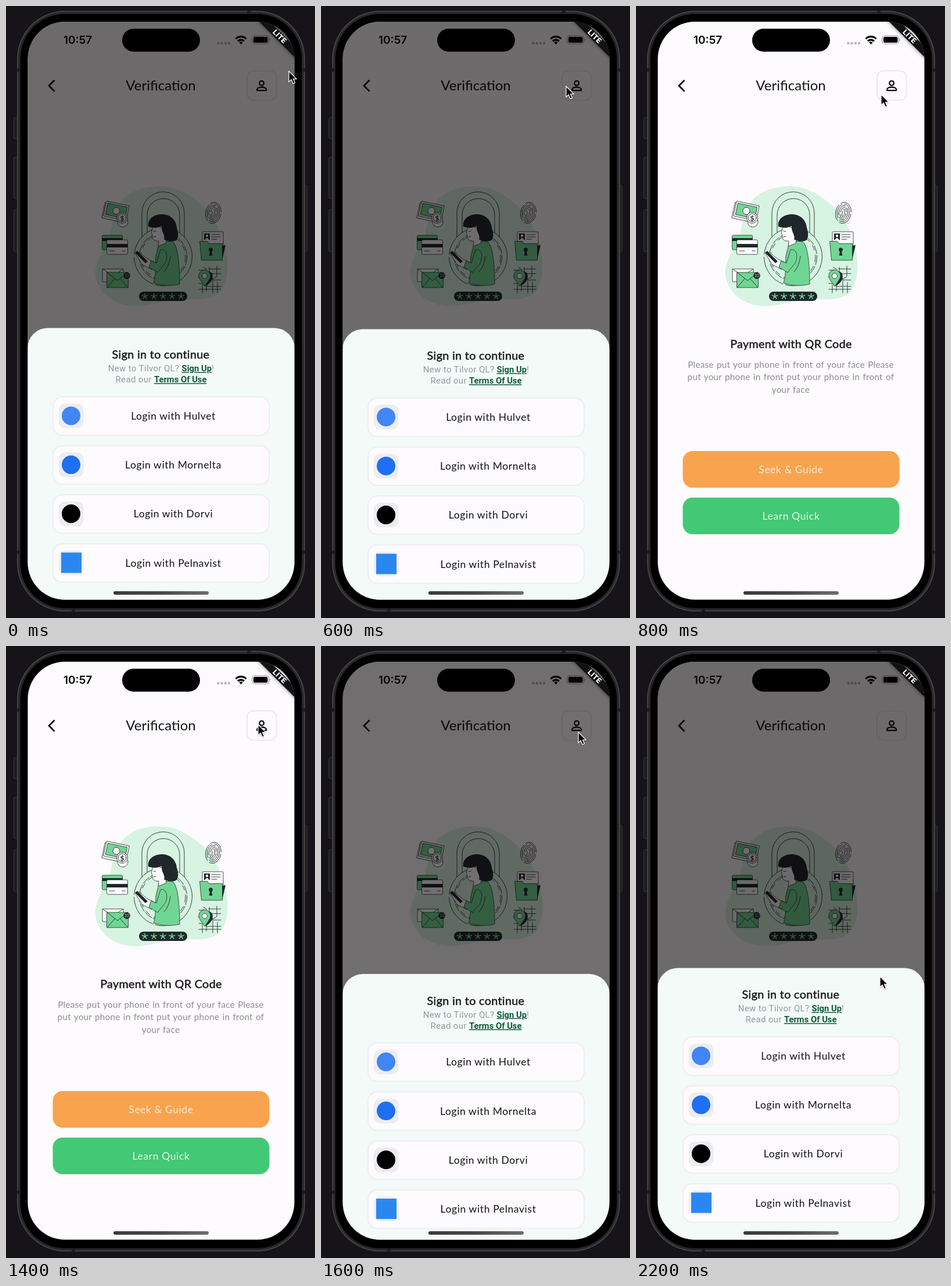
An HTML page that plays this animation: 532 px wide and 1052 px high, repeating every 2300 ms.

```html
<!DOCTYPE html>
<html lang="en">
<head>
<meta charset="utf-8">
<title>Sign-in sheet</title>
<style>
  html, body { margin: 0; width: 100%; height: 100%; overflow: hidden; background: #161418; }
  svg { display: block; width: 100%; height: 100%; }
  text { font-family: Lato, "Open Sans", sans-serif; }
  .mid { text-anchor: middle; }
  .title { font-size: 19.8px; letter-spacing: .32px; fill: #1b1b1d; stroke: #1b1b1d; stroke-width: .5; }
  .body { font-size: 15.3px; letter-spacing: .25px; word-spacing: 1px; fill: #8b8b8f; }
  .btn { font-size: 17.5px; letter-spacing: .62px; }
  .note { font: 15px Roboto, sans-serif; letter-spacing: .36px; fill: #909a9e; }
  .link { font-weight: 700; font-size: 14.8px; letter-spacing: 0; fill: #105a37; text-decoration: underline; }
  .ink { fill: none; stroke: #262b2d; stroke-width: .9; stroke-linejoin: round; stroke-linecap: round; }
  .green { fill: #70d693; stroke: #262b2d; stroke-width: .8; stroke-linejoin: round; }
  .white { fill: #fdfbfe; stroke: #262b2d; stroke-width: .8; stroke-linejoin: round; }
  .dark { fill: #20272b; }
</style>
</head>
<body>
<svg viewBox="0 0 532 1052" preserveAspectRatio="none">
  <defs>
    <clipPath id="screen"><rect x="37.500" y="27" width="459" height="993.500" rx="64"/></clipPath>
    <linearGradient id="bar">
      <stop stop-color="#3b393c"/><stop offset=".5" stop-color="#4a474b"/><stop offset="1" stop-color="#6f6c70"/>
    </linearGradient>
    <filter id="soft" x="-30%" y="-100%" width="160%" height="300%"><feGaussianBlur stdDeviation="3"/></filter>
    <filter id="blur" x="-50%" y="-50%" width="200%" height="200%"><feGaussianBlur stdDeviation="1.2"/></filter>
  </defs>

  <!-- phone body -->
  <rect width="532" height="1052" fill="#161418"/>
  <g fill="#1c1b1e" stroke="#39383b">
    <rect x="13.500" y="192" width="10" height="36" rx="2"/>
    <rect x="13.500" y="260" width="10" height="71" rx="2"/>
    <rect x="13.500" y="350" width="10" height="72" rx="2"/>
    <rect x="509" y="308" width="9.500" height="114" rx="2"/>
  </g>
  <rect x="20" y="9" width="494" height="1031" rx="82" fill="#29292b" stroke="#4a4a4c" stroke-width="1.600"/>
  <path d="M19 107h5v6h-5zM510 107h5v6h-5zM19 936h5v6h-5zM510 936h5v6h-5zM415 8h6v5h-6zM113 1036h6v5h-6z" fill="#1d1d1f"/>
  <rect x="24.500" y="13.500" width="485" height="1022" rx="77" fill="#000" stroke="#1b1b1d"/>

  <g clip-path="url(#screen)">
    <rect x="37" y="27" width="460" height="994" fill="#fdfbfe"/>

    <!-- status bar -->
    <text x="99" y="65" style="font:600 19px Inter,sans-serif">10:57</text>
    <path d="M365.500 64h.01M371.700 64h.01M377.900 64h.01M384 64h.01" stroke="#b7b5b8" stroke-width="4.400" stroke-linecap="round"/>
    <path d="M395.500 56.500a12.600 12.600 0 0 1 18 0M399 60.400a7.800 7.800 0 0 1 11 0" fill="none" stroke="#000" stroke-width="3.200"/>
    <path d="M404.500 66l-3.200-3.400a4.600 4.600 0 0 1 6.400 0z"/>
    <rect x="424" y="51" width="28.500" height="14" rx="4.500" fill="none" stroke="#8f8d90" stroke-width="1.200"/>
    <rect x="426" y="53" width="24.500" height="10" rx="2.800"/>
    <path d="M454 55.500q2.200 2.500 0 5z" fill="#8f8d90"/>

    <!-- header -->
    <path d="M83.500 127.500L74 137l9.500 9.700" fill="none" stroke="#0b0b0c" stroke-width="2.800"/>
    <text class="mid" x="266.500" y="145" font-size="24" fill="#141416">Verification</text>
    <rect x="415" y="111.500" width="50.500" height="50.500" rx="11" fill="none" stroke="#ebe9ec" stroke-width="2"/>
    <g fill="none" stroke="#0b0b0c" stroke-width="2.300" stroke-linejoin="round">
      <rect x="436.400" y="128.800" width="7.500" height="7.600" rx="3.500"/>
      <path d="M432.300 145.200v-2c0-2.200 4-3.700 7.900-3.700s7.900 1.500 7.900 3.700v2z"/>
    </g>

    <!-- illustration -->
    <path fill="#d7f3e1" d="M262 310C290 309 310 321 328 335C352 351 369 382 377 411C384 444 384 476 367 493C352 507 327 504 303 504C271 505 251 516 221 516C186 515 159 494 154 464C151 437 172 417 180 389C185 362 189 341 209 326C223 315 242 310 262 310Z"/>
    <g class="ink">
      <path d="M234 397V356a36.500 36.500 0 0 1 73 0V397M243 389V359a28 28 0 0 1 56 0V389"/>
      <circle cx="270.500" cy="431" r="50" stroke-dasharray="92 4 60 5"/>
      <circle cx="270.500" cy="431" r="41" stroke-dasharray="14 3"/>
      <circle cx="270.500" cy="431" r="38.500" stroke-dasharray="9 8"/>
    </g>

    <g id="woman">
      <path class="green" d="M263 410C271 404 282 403 288 406C296 414 299 446 299 478C284 482 268 481 254 476C259 462 257 444 258 430Z"/>
      <path class="white" d="M254 377C251 386 249 391 252 393C251 401 255 405 263 404L262 413L275 408L279 384Z"/>
      <path class="dark" d="M245 379C243 366 255 358 268 358C283 358 293 368 294 381C296 388 298 395 294 402C288 406 278 405 272 401C275 394 267 389 268 378C261 382 253 382 245 379Z"/>
      <path class="ink" d="M254 387q2 2 4 0M254 397l4-1"/>
      <path class="white" d="M223 426l6-3l15 12l11 5l-4 13l-17-9z"/>
      <path class="dark" d="M222 424l4-3l18 18l-4 3z"/>
      <path class="green" d="M266 419C276 416 280 430 274 442L261 458L246 449L250 438L259 442Z"/>
      <path class="ink" d="M283 430q-2 18-11 27"/>
    </g>

    <rect class="dark" x="229" y="491" width="83" height="16" rx="8"/>
    <path id="stars" fill="none" stroke="#70d693" stroke-width="1.500" stroke-linecap="round"/>

    <g id="money">
      <g transform="rotate(12 189 352)">
        <rect class="white" x="168" y="342" width="40" height="27"/>
        <rect class="white" x="170" y="339" width="40" height="26"/>
        <rect class="green" x="173" y="342" width="34" height="20"/>
        <circle class="white" cx="190" cy="352" r="6"/>
      </g>
      <circle class="white" cx="201" cy="371" r="9"/>
      <circle class="white" cx="200" cy="364" r="9.500"/>
      <circle class="ink" cx="200" cy="364" r="7"/>
      <text class="mid" x="200" y="368.500" font-size="12" font-weight="700" fill="#262b2d">$</text>
    </g>
    <g id="cards">
      <rect class="green" x="165.500" y="394" width="35" height="25" rx="2"/>
      <path class="dark" d="M165.500 399h35v5h-35z"/>
      <rect class="white" x="173.500" y="402" width="36" height="25" rx="2"/>
      <path class="dark" d="M173.500 409h36v6h-36z"/>
      <path class="ink" d="M178 421h9M200 421h5"/>
    </g>
    <g id="mail">
      <rect class="white" x="166" y="452" width="36" height="22" rx="1"/>
      <path class="ink" d="M166 452l18 12l18-12"/>
      <rect class="green" x="173.500" y="458" width="37" height="26" rx="1"/>
      <path class="ink" d="M174 458l18 14l18-14M174 484l13-15M210 484l-13-15"/>
      <circle class="dark" cx="208" cy="463.500" r="5.800"/>
      <text class="mid" x="208" y="466" font-size="7" fill="#c9d8cf">10</text>
    </g>
    <g id="print" class="ink" transform="rotate(10 357 355.500)"></g>
    <g id="folder">
      <rect class="white" x="338" y="388" width="36" height="28" rx="1"/>
      <rect class="dark" x="341" y="391" width="10" height="11"/>
      <circle cx="346" cy="395" r="2.200" fill="#fdfbfe"/>
      <path d="M342.500 402q3.500-7 7 0z" fill="#fdfbfe"/>
      <path class="ink" d="M354 393h15M354 397h15M354 401h9"/>
      <path class="dark" d="M369 413l9-2l-6 26z"/>
      <path class="green" d="M333.500 404.500h13l3 4h23V437h-36z"/>
      <circle class="dark" cx="352.500" cy="419" r="3.400"/>
      <path class="dark" d="M351.500 419h2l1.800 10h-5.600z"/>
    </g>
    <g id="map">
      <path class="ink" d="M332 454h10M349 452h21M332 477h8l5 5h25M332 487h38M338 493v-14M350 449v14l6 6v24M363 447v18l-8 5M364 475v18M354 460h16M331 466h6M357 471h13M345 490v-8M340 449l6 4"/>
      <path class="dark" d="M347 456c11 0 11 13 4 20l-7 6z"/>
      <path class="green" d="M342 482C336 473 332 469 332 463.500a10 10 0 0 1 20 0C352 469 348 473 342 482Z"/>
      <circle class="white" cx="342" cy="464" r="4.500"/>
    </g>

    <text class="title mid" x="267" y="587.500">Payment with QR Code</text>
    <g class="body mid">
      <text x="266.500" y="622">Please put your phone in front of your face Please</text>
      <text x="266.500" y="643">put your phone in front put your phone in front of</text>
      <text x="266.500" y="664.500">your face</text>
    </g>
    <rect x="80.500" y="765" width="373" height="63" rx="17" fill="#faa34e"/>
    <rect x="80.500" y="845" width="373" height="63" rx="17" fill="#43c876"/>
    <g class="btn mid" fill="#fff" fill-opacity=".84">
      <text x="267" y="803">Seek &amp; Guide</text>
      <text x="267" y="883">Learn Quick</text>
    </g>

    <rect id="dim" x="37" y="27" width="460" height="994" fill="#050002"/>

    <!-- sign-in sheet, drawn from its own top edge -->
    <g id="sheet">
      <path d="M37 470V35a35 35 0 0 1 35-35H462a35 35 0 0 1 35 35V470z" fill="#f3faf8"/>
      <text class="title mid" x="266.500" y="52.700">Sign in to continue</text>
      <text class="note mid" x="267" y="74.700">New to Tilvor QL? <tspan class="link">Sign Up</tspan>!</text>
      <text class="note mid" x="267" y="93.900">Read our <tspan class="link">Terms Of Use</tspan></text>
      <g id="logins"></g>
    </g>

    <!-- corner ribbon -->
    <g transform="translate(496 27) rotate(45)">
      <rect x="-60" y="29.500" width="120" height="13" opacity=".55" filter="url(#soft)"/>
      <rect x="-60" y="29.500" width="120" height="13" fill="#121113"/>
      <text class="mid" x=".5" y="39.900" fill="#fff" style="font:800 12.500px Inter,sans-serif;letter-spacing:.3px">LITE</text>
    </g>
    <rect x="185" y="1006" width="164" height="6" rx="3" fill="url(#bar)"/>
  </g>
  <rect x="200" y="39" width="134" height="39.500" rx="19.700"/>

  <g id="cursor">
    <path d="M0 1.500V20L4.300 16 7.200 22.800 10.400 21.400 7.600 15H13.300Z" opacity=".35" filter="url(#blur)"/>
    <path d="M0 0V18.500L4.300 14.600 7.200 21.500 10.400 20.100 7.600 13.400H13.300Z" stroke="#fff" stroke-width="1.300" stroke-linejoin="round"/>
  </g>
</svg>

<script>
const $ = id => document.getElementById(id);
const clamp = v => Math.min(1, Math.max(0, v));

const LOOP = 2300, STEP = 100;
const SHEET_TOP = 553.4, SHEET_HEIGHT = 466.6, DIM = 0.575;

// Cubic bezier easing, solved by bisection.
function bezier(x1, y1, x2, y2) {
  const at = (a, b, s) => 3 * a * s * (1 - s) ** 2 + 3 * b * s * s * (1 - s) + s ** 3;
  return x => {
    if (x <= 0 || x >= 1) return clamp(x);
    let lo = 0, hi = 1;
    for (let i = 0; i < 30; i++) {
      const m = (lo + hi) / 2;
      if (at(x1, x2, m) < x) lo = m; else hi = m;
    }
    return at(y1, y2, lo);
  };
}
const slide = bezier(0, 0, 0.2, 1);
const fade = bezier(0.25, 0.1, 0.25, 1);

// Cursor tip: time, x, y
const route = [
  [0, 487, 112], [600, 422, 138], [800, 422, 152], [1000, 423, 151],
  [1400, 434, 135], [1500, 435, 138], [1600, 443, 148],
  [1800, 445, 189], [2000, 434, 400], [2200, 420, 568]
];

function cursorAt(t) {
  const i = route.findIndex(p => p[0] >= t);
  if (i === 0) return route[0].slice(1);
  const [t0, x0, y0] = route[i - 1], [t1, x1, y1] = route[i];
  const k = (t - t0) / (t1 - t0);
  return [x0 + (x1 - x0) * k, y0 + (y1 - y0) * k];
}

// Sheet progress: closes in 200 ms, later opens in 250 ms.
const openness = t => t < 1000 ? clamp(1 - (t - 582) / 200) : clamp((t - 1400) / 250);

function buildLogins() {
  const dot = color => `<circle cx="112" cy="151" r="16" fill="${color}"/>`;
  const rows = [
    ["Hulvet", dot("#4285f4")],
    ["Mornelta", dot("#1f6ff2")],
    ["Dorvi", dot("#000")],
    ["Pelnavist", '<rect x="95" y="133.500" width="35" height="35" fill="#2b87f0"/>']
  ];
  $("logins").innerHTML = rows.map(([name, mark], i) => `
    <g transform="translate(0 ${i * 84.2})">
      <rect x="81" y="118.500" width="372" height="66" rx="16" fill="#fdfbfe" stroke="#edeef0" stroke-width="2"/>
      <rect x="91" y="130" width="42.500" height="42.500" rx="11" fill="#ededef"/>
      ${mark}
      <text class="btn mid" x="288" y="157.500" fill="#111113">Login with ${name}</text>
    </g>`).join("");
}

function buildStars() {
  let d = "";
  for (let i = 0; i < 5; i++) {
    for (let a = 0; a < 5; a++) {
      const r = a * Math.PI * 0.4 - Math.PI / 2;
      d += `M${239 + i * 15.6} 499l${5 * Math.cos(r)} ${5 * Math.sin(r)}`;
    }
  }
  $("stars").setAttribute("d", d);
}

// Broken rings, nested like a fingerprint.
function buildPrint() {
  let out = "";
  for (let i = 0; i < 5; i++) {
    const r = 2 + i * 2.8;
    out += `<ellipse cx="357" cy="355.500" rx="${r}" ry="${r + 5}" stroke-dasharray="${17 + i * 3} 4"/>`;
  }
  $("print").innerHTML = out;
}

function draw(t) {
  const v = openness(t), [x, y] = cursorAt(t);
  const top = SHEET_TOP + SHEET_HEIGHT * (1 - slide(v));
  $("sheet").setAttribute("transform", `translate(0 ${top})`);
  $("sheet").setAttribute("visibility", v > 0 ? "visible" : "hidden");
  $("dim").setAttribute("opacity", DIM * fade(v));
  $("cursor").setAttribute("transform", `translate(${x} ${y})`);
}

buildLogins();
buildStars();
buildPrint();
draw(0);

let start;
function tick(now) {
  start ??= now;
  draw(Math.floor((now - start) % LOOP / STEP) * STEP);
  requestAnimationFrame(tick);
}
requestAnimationFrame(tick);
</script>
</body>
</html>
```
